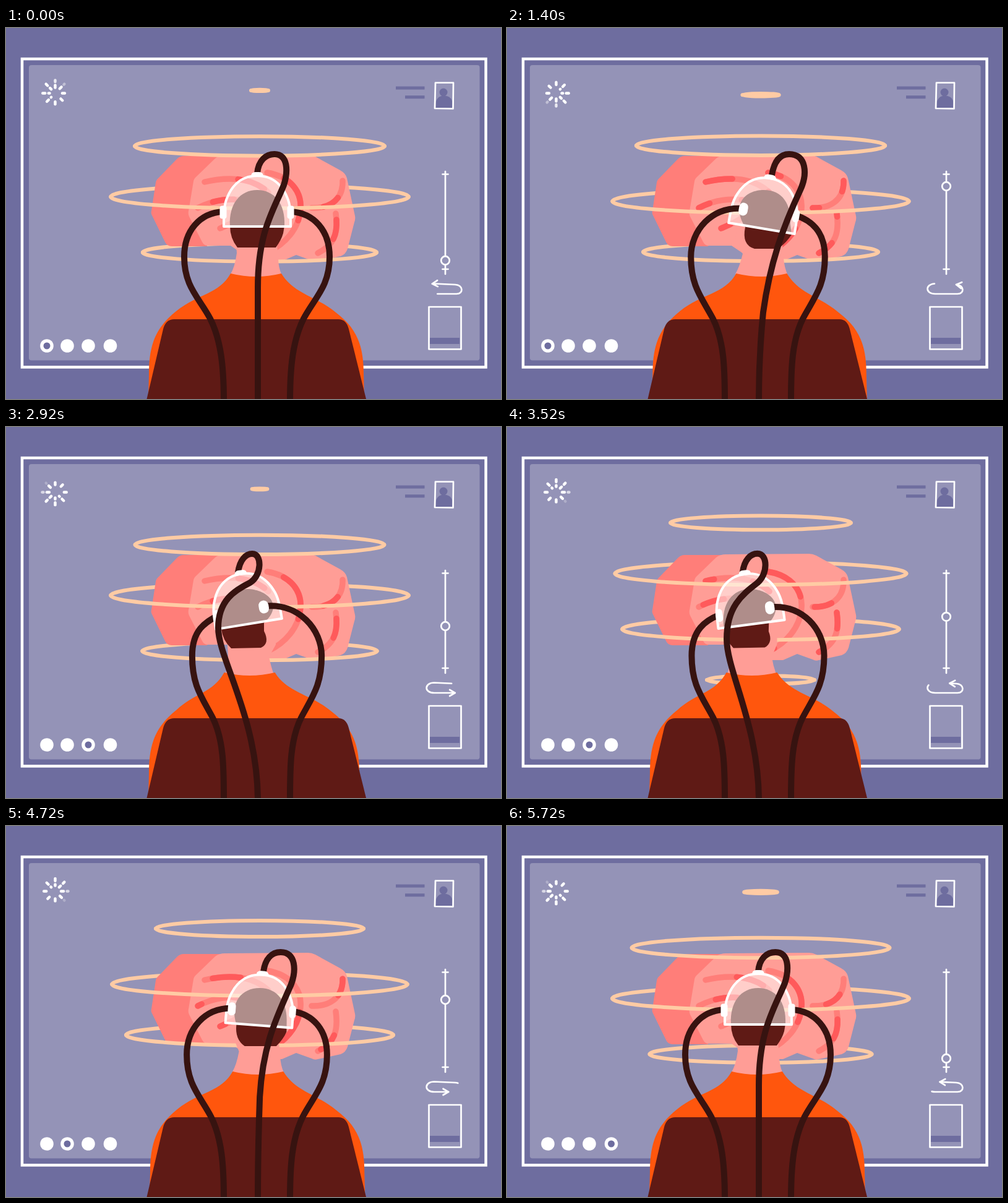
These frames come from a looping animation (800 px wide and 600 px high, 5.76 s). An HTML page:

```html
<!DOCTYPE html>
<html lang="en">
<head>
<meta charset="utf-8">
<title>Brain scan</title>
<style>
  html, body { margin: 0; width: 100%; height: 100%; overflow: hidden; background: #6e6d9f; }
  svg { display: block; width: 800px; height: 600px; }
  .line { fill: none; stroke: #fff; stroke-linecap: round; stroke-linejoin: round; stroke-width: 2.7; }
  .ring { fill: none; stroke: #ffcba4; stroke-width: 6; stroke-linecap: round; }
  .cable { fill: none; stroke: #371310; stroke-width: 10; stroke-linecap: round; }
  .fold { fill: none; stroke: #ff7e79; stroke-width: 9.5; stroke-linecap: round; }
  .pulse { stroke: #ff5a5b; }
</style>
</head>
<body>
<svg viewBox="0 0 800 600">
  <rect width="800" height="600" fill="#6e6d9f"/>
  <rect x="26" y="50" width="749.5" height="498.5" fill="none" stroke="#fff" stroke-width="4.5"/>
  <rect x="37" y="60" width="728.5" height="477.5" rx="4" fill="#9493b7"/>

  <g id="loader" class="line" style="stroke-width:4.4"></g>
  <g fill="#6e6d9f">
    <path d="M630 94.5H676.500V99.500H630ZM645 109.300H676.500V114.300H645Z"/>
    <circle cx="707" cy="104" r="6.500"/>
    <path d="M694.500 129.500V122Q696 109.500 708 109.500Q721 110 721.500 122V129.500Z"/>
    <rect x="685" y="501" width="48" height="10"/>
  </g>
  <path class="line" d="M694 88.500L723 88.500L722.500 130.500L693 130ZM683.500 451H735.500V519.500H683.500ZM710 232V398M705.500 236.500H714.500M705.500 390H714.500"/>
  <circle id="knob" class="line" cx="710" r="6.800" style="fill:#9493b7"/>
  <path id="orbit" class="line" d="M726 415L692 413.500C676 413.500 675 430 692 430L728 430C740 430 739 415.500 726 415Z"/>
  <path id="tip" class="line" d="M8.500 -5L0 0L8.500 5"/>
  <g id="dots"></g>

  <path id="ringBack" class="ring"/>
  <path fill="#ff7e79" d="M287 207H350L325 353H268Q260 353 257 346L236 303Q234 300 235 296L242 250Q243 245 247 242L276 212Q281 207 287 207Z"/>
  <path fill="#ff9d96" d="M354 206L488 205Q494 205 500 208L540 230Q549 235 551 243L564 304Q565 309 563 314L552 357Q549 366 541 369L504 377Q499 379 494 376L469 367L446 377H400L363 352H326Q320 352 317 346L296 305Q294 301 295 296L303 248Q304 243 308 240L338 211Q344 206 354 206Z"/>
  <g id="folds"></g>
  <path id="ringFront" class="ring"/>

  <path id="skin" fill="#ff9d96"/>
  <path id="body" fill="#ff560d"/>
  <path fill="#5f1a15" d="M227.500 600L254 487Q258 471 272 471H537Q550 471 554 487L582 600Z"/>
  <path id="hair" fill="#5f1a15"/>
  <g id="rear"></g>
  <path id="glass" fill="#fff" fill-opacity=".5" stroke="#fff" stroke-width="4" stroke-linejoin="round"
    d="M352 321C352 300 352 286 358 273C368 249 386 239 406 239C426 239 444 249 454 273C460 286 460 300 460 321Z"/>
  <g id="front"></g>
  <path id="midCable" class="cable"/>
  <path id="cap" fill="#fff" d="M396.500 241V237Q398 233 403 233H409Q414 233 415.500 237V241Z"/>
</svg>
<script>
const LOOP = 5760;
const $ = id => document.getElementById(id);
const set = (el, attrs) => { for (const k in attrs) el.setAttribute(k, attrs[k]); return el; };
const add = (parent, tag, attrs) =>
  set(parent.appendChild(document.createElementNS('http://www.w3.org/2000/svg', tag)), attrs);
const clamp = x => Math.max(0, Math.min(1, x));
const smooth = x => x * x * (3 - 2 * x);
const frac = x => x - Math.floor(x);

// Each move is [start, end, value]; the value holds in between.
function track(t, value, moves) {
  for (const [a, b, to] of moves) value += (to - value) * smooth(clamp((t - a) / (b - a)));
  return value;
}

// Blend the numbers of two paths with the same commands.
function blend(from, to, k) {
  const end = to.match(/-?[\d.]+/g);
  let i = 0;
  return from.replace(/-?[\d.]+/g, n => (+n + (end[i++] - n) * k).toFixed(2));
}
const pose = (p, h) => h < 0 ? blend(p.mid, p.left, -h / 28) : blend(p.mid, p.right, h / 20);

const hair = {
  mid: 'M362 320C360 285 378 262 406 262S452 285 450 320L448 332Q445 343 436 355L374 355Q362 340 362 320Z',
  right: 'M385 322C362 285 385 262 415 262S460 285 458 318L460 334Q452 347 438 357L400 357Q379 351 385 322Z',
  left: 'M348 326C342 285 362 262 390 262S452 285 417 317L417 330Q427 350 412 357L364 358Q350 345 348 326Z'
};
const skin = {
  mid: 'M372 325L372 350L373 364Q370 386 363 398Q404 407 445 398Q440 386 440 372L438 350L440 325Z',
  right: 'M371 320L369 350L381 365Q376 386 369 398Q411 407 453 398Q448 386 447 372L445 355L450 325Z',
  left: 'M355 325L358 352L359 372Q358 386 355 398Q393 407 432 398Q428 386 425 372L436 352L436 315Z'
};
const midCable = {
  mid: 'M406 235C408 214 420 204 434 204C456 204 456 232 449 254C432 296 407 330 407 420C407 480 407 540 407 605',
  right: 'M428 238C432 214 442 204 456 204C484 204 486 236 474 262C446 322 425 380 414 460C410 500 407 560 407 605',
  left: 'M375 235C378 214 388 205 398 205C414 205 414 240 394 252C370 264 343 280 343 325C343 375 407 470 407 605'
};

// Brain folds: path, start of the pulse, its length, direction
const folds = [
  ['M321 249C350 242 395 238 424 266', .5, .42, 1],
  ['M310 291C335 278 360 274 395 280', .3, .4, -1],
  ['M346 324C360 318 375 312 390 300', .46, .35, -1],
  ['M422 234C460 240 478 265 476 292C474 325 450 350 424 362', .16, .44, -1],
  ['M494 291C520 292 545 280 544 247', .25, .37, -1],
  ['M533 300C537 330 532 350 504 364', .13, .42, -1]
].map(([d, start, len, dir]) => {
  add($('folds'), 'path', { d, class: 'fold' });
  const el = add($('folds'), 'path', { d, class: 'fold pulse', pathLength: 1, 'stroke-dasharray': `${len} ${1 - len}` });
  return { el, start, dir };
});

const dots = [66, 99, 133, 168.5].map(cx => {
  add($('dots'), 'circle', { cx, cy: 514, r: 10.8, fill: '#fff' });
  return add($('dots'), 'circle', { cx, cy: 514, r: 5.5, fill: '#6e6d9f' });
});

const spokes = Array.from({ length: 8 }, (_, k) => {
  const g = add($('loader'), 'g', { transform: `translate(79.5 105.500) rotate(${-90 - 45 * k})` });
  return [-1, 0, 1].map(() => add(g, 'path', {}));
});

const cups = [0, 1].map(side => {
  const g = add($('front'), 'g', side ? { transform: 'matrix(-1 0 0 1 811 0)' } : {});
  return { g, cable: add(g, 'path', { class: 'cable' }), cup: add(g, 'rect', { fill: '#fff' }) };
});

// Ring half-width by distance from the middle height
const profile = [[0, 241], [33, 236], [54, 225], [67, 216], [80, 202], [92, 189], [105, 168],
  [118, 142], [139, 84], [163, 29], [170, 14], [174, 3]];
function ringWidth(y) {
  const d = Math.abs(y - 271);
  const i = profile.findIndex(p => p[0] > d);
  if (i < 1) return 0;
  const [[a, ra], [b, rb]] = [profile[i - 1], profile[i]];
  return ra + (rb - ra) * (d - a) / (b - a);
}

function drawRings(t) {
  let back = '', front = '';
  for (let k = 0; k < 10; k++) {
    const y = 101 - .0591 * t + 172 * (k >> 1) + 90 * (k & 1);
    const r = ringWidth(y);
    if (!r) continue;
    const arc = sweep => `M${410 - r} ${y}A${r} ${r * .078} 0 0 ${sweep} ${410 + r} ${y}`;
    back += arc(1);
    front += arc(0);
  }
  set($('ringBack'), { d: back });
  set($('ringFront'), { d: front });
}

function drawLoader(t) {
  spokes.forEach((dashes, k) => {
    const f = frac((t - 40) / 400 - k / 8);
    dashes.forEach((el, n) => {
      const c = 12 + 9.5 * (f + n - 1);
      const a = Math.max(c - 2, 9), b = Math.min(c + 2, 21);
      set(el, { d: a < b ? `M${a} 0H${b}` : '', opacity: clamp((23 - c) / 3) });
    });
  });
}

const orbit = $('orbit'), lap = orbit.getTotalLength(), tail = lap * .73;
function drawArrow(t) {
  const s = lap * frac(.285 + t / 1960);
  const p = orbit.getPointAtLength(s);
  const q = orbit.getPointAtLength((s - 3 + lap) % lap);
  const turn = Math.atan2(q.y - p.y, q.x - p.x) * 180 / Math.PI;
  set(orbit, { 'stroke-dasharray': `${tail} ${lap - tail}`, 'stroke-dashoffset': tail - s });
  set($('tip'), { transform: `translate(${p.x} ${p.y}) rotate(${turn})` });
}

function drawSide({ g, cable, cup }, h, tilt) {
  const near = h >= 0, a = Math.abs(h);
  const x = 351 + h * (near ? 1.55 : .35), y = 298 - h * (near ? .25 : .3);
  const w = 11 + (near ? .18 * a : 0), bend = 288 + .46 * a, hip = 330 + .14 * a;
  set(cable, { d: `M${x} ${y - 1}C${x - 38 - .7 * h} ${y + 1 - .3 * h} ${bend} 328 ${bend} 370` +
    `C${bend} 418 ${hip - 18} 436 ${hip} 470C${hip + 18} 506 352 550 352 605` });
  set(cup, { x: x - w / 2, y: y - 10.5, width: w, height: 21, rx: Math.min(w / 2, 4 + .2 * a),
    transform: `rotate(${tilt} ${x} ${y})` });
  const layer = $(near ? 'front' : 'rear');
  if (g.parentNode !== layer) layer.appendChild(g);
}

function drawPerson(h) {
  const right = h > 0;
  const tilt = h * (right ? .48 : .33);
  const move = `translate(${h * (right ? .27 : .48)} ${h * (right ? .15 : .09)}) rotate(${tilt} 406 321)`;
  set($('glass'), { transform: move });
  set($('cap'), { transform: move });
  set($('hair'), { d: pose(hair, h) });
  set($('skin'), { d: pose(skin, h) });
  set($('midCable'), { d: pose(midCable, h) });

  const c = .37 * h, l = right ? .22 * h : 0, r = h * (right ? .14 : .25);
  set($('body'), { d: `M${363 + c} 397C${345 + c} 430 ${310 + c / 2} 430 ${275 + l} 458` +
    `C${240 + l} 486 ${231 + l} 515 ${231 + l} 560L${230 + l} 600H${579 + r}L${578 + r} 560` +
    `C${578 + r} 515 ${568 + r} 486 ${533 + r} 460C${500 + c / 2} 433 ${465 + c} 430 ${445 + c} 397` +
    `Q${404 + c} 407 ${363 + c} 397Z` });

  drawSide(cups[0], h, tilt);
  drawSide(cups[1], -h, -tilt);
}

function draw() {
  const t = performance.now() % LOOP;
  drawRings(t);
  drawLoader(t);
  drawArrow(t);
  drawPerson(track(t, 0, [[0, 700, 20], [1850, 2920, -28], [3300, 4230, 9], [4820, 5420, 0]]));
  set($('knob'), { cy: track(t, 376, [[0, 700, 256], [1650, 2700, 322], [3080, 4150, 281], [4720, 5420, 376]]) });
  for (const { el, start, dir } of folds)
    set(el, { 'stroke-dashoffset': -frac(start + dir * t / 2911) });
  const active = t < 2400 ? 0 : t < 3800 ? 2 : t < 5100 ? 1 : 3;
  dots.forEach((dot, i) => set(dot, { opacity: +(i === active) }));
  requestAnimationFrame(draw);
}
draw();
</script>
</body>
</html>
```
